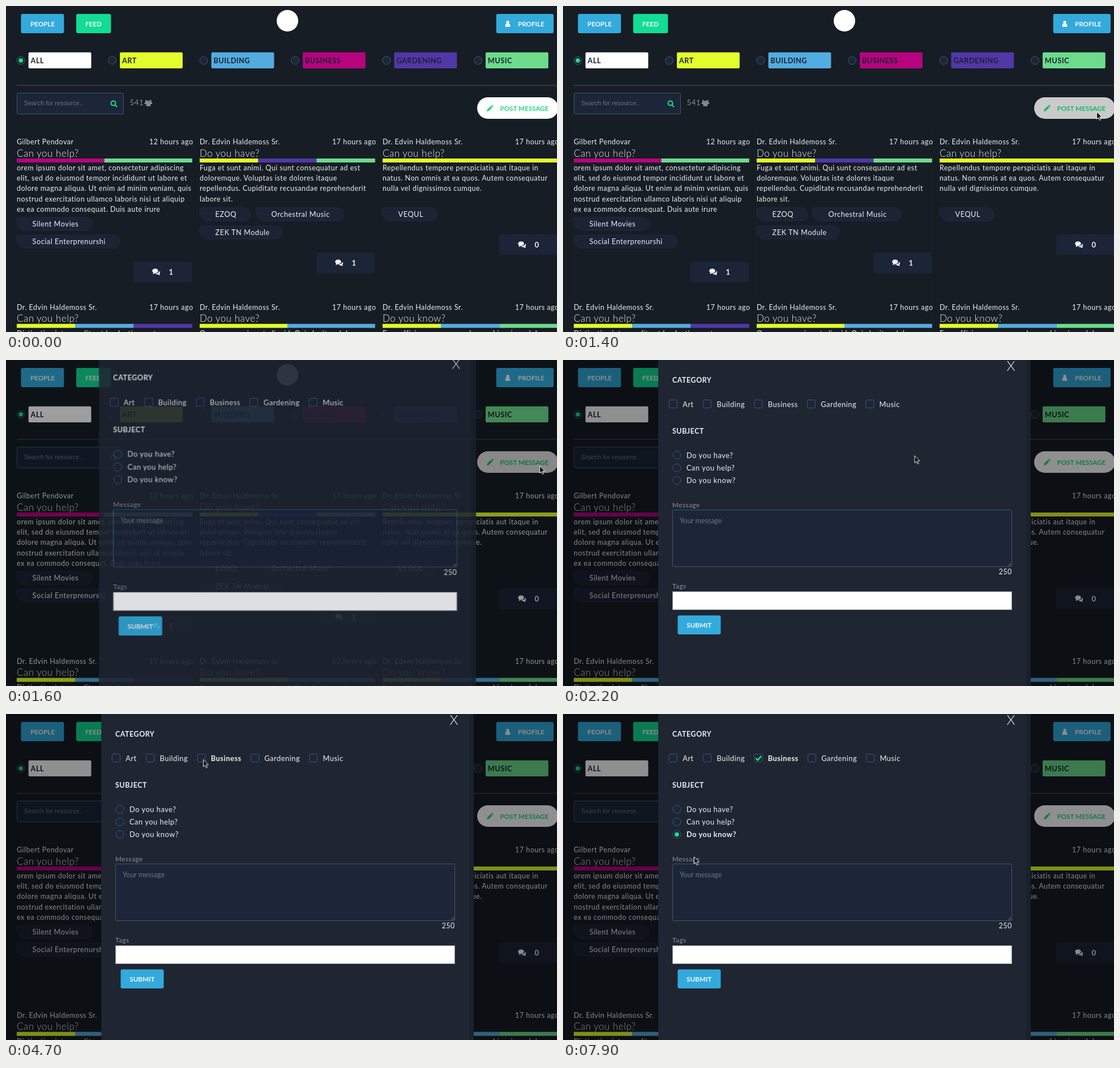
Recreate the animation shown at these times as an HTML page. Size 973 px wide and 575 px high, loop 8000 ms.

```html
<!DOCTYPE html>
<html lang="en">
<head>
<meta charset="utf-8">
<title>Message board</title>
<style>
html, body { margin: 0; width: 100%; height: 100%; overflow: hidden; background: #161d24; }
svg { display: block; width: 973px; height: 575px; }
text { font: 12.5px Lato, sans-serif; letter-spacing: .5px; fill: #eef0f2; white-space: pre; }
.btn { font-size: 11.65px; font-weight: 700; letter-spacing: 0; fill: #f6fafc; }
.cat { font-size: 12.7px; font-weight: 700; fill: #1b2130; }
.head { font-size: 17px; font-weight: 300; }
.tag { font-size: 12.75px; }
.num { font-size: 13px; font-weight: 700; }
.count { font-size: 12.8px; letter-spacing: .9px; fill: #878e95; }
.find { font: 11.1px "Liberation Sans", Arial, sans-serif; letter-spacing: 0; fill: #6d747c; }
.title { font-weight: 700; }
.opt { font-size: 12.9px; }
.label { font-size: 11.8px; fill: #8b929b; }
.hint { font-size: 12.4px; letter-spacing: 0; fill: #6f7680; }
.close { font-size: 24px; font-weight: 300; letter-spacing: 0; }
.field { fill: #1c2638; stroke: #3f5574; }

.post, .ink, .veil, .modal, .bold, .pick, .push, .tick, .dot, .cursor {
  animation: 8s step-end infinite;
}
.post { animation-name: post; }
.ink { animation-name: ink; }
.veil { animation-name: veil; }
.modal { animation-name: modal; transform-origin: 497.5px 320px; }
.bold { animation-name: bold; }
.pick { animation-name: pick; }
.push { animation-name: push; }
.tick { animation-name: tick; transform-origin: 345px 78px; }
.dot { animation-name: dot; transform-origin: 201px 212.5px; }
.cursor { animation-name: cursor; }

@keyframes post {
  0% { fill: #fff; }
  6.25% { fill: #fff; animation-timing-function: steps(5); }
  12.5% { fill: #cacaca; }
  18.75% { fill: #cacaca; animation-timing-function: steps(3); }
  22.5%, 100% { fill: #fff; }
}
@keyframes ink {
  0% { fill: #1fdc84; }
  6.25% { fill: #1fdc84; animation-timing-function: steps(5); }
  12.5% { fill: #18b96a; }
  22.5%, 100% { fill: #1fdc84; }
}
@keyframes veil {
  0% { opacity: 0; }
  18.75% { opacity: .2; }
  20% { opacity: .87; }
  21.25% { opacity: .98; }
  22.5%, 100% { opacity: 1; }
}
@keyframes modal {
  0% { opacity: 0; transform: scale(1.05); }
  18.75% { opacity: .2; transform: scale(1.04); }
  20% { opacity: .87; transform: scale(1.0125); }
  21.25% { opacity: .98; transform: scale(1.0015); }
  22.5%, 100% { opacity: 1; transform: none; }
}
@keyframes bold { 0% { font-weight: 400; } 58.75%, 100% { font-weight: 700; } }
@keyframes pick { 0% { font-weight: 400; } 92.5%, 100% { font-weight: 700; } }
@keyframes push { 0% { transform: none; } 58.75%, 100% { transform: translateX(1px); } }
@keyframes tick {
  0% { opacity: 0; transform: scale(.4); }
  58.75% { opacity: 0; transform: scale(.4); animation-timing-function: steps(3); }
  62.5%, 100% { opacity: 1; transform: scale(1); }
}
@keyframes dot {
  0% { opacity: 0; transform: scale(.2); }
  92.5% { opacity: 0; transform: scale(.2); animation-timing-function: steps(3); }
  96.25%, 100% { opacity: 1; transform: scale(1); }
}
@keyframes cursor {
  0% { transform: translate(978px, 182px); }
  6.25% { transform: translate(978px, 182px); animation-timing-function: steps(2); }
  8.75% { transform: translate(955px, 183px); animation-timing-function: steps(7); }
  17.5% { transform: translate(942px, 186px); }
  20% { transform: translate(942px, 186px); animation-timing-function: steps(3); }
  23.75% { transform: translate(815px, 178px); animation-timing-function: steps(3); }
  27.5% { transform: translate(620.5px, 168px); }
  28.75% { transform: translate(547px, 167px); }
  30% { transform: translate(546px, 167px); }
  36.25% { transform: translate(545px, 167px); }
  41.25% { transform: translate(545px, 168px); }
  45% { transform: translate(545px, 168px); animation-timing-function: steps(2); }
  47.5% { transform: translate(490px, 138px); animation-timing-function: steps(2); }
  50% { transform: translate(390px, 78px); }
  51.25% { transform: translate(360px, 64px); }
  52.5% { transform: translate(349px, 77px); }
  55% { transform: translate(348px, 79.5px); }
  70% { transform: translate(348px, 79.5px); animation-timing-function: steps(9); }
  81.25% { transform: translate(221px, 212px); }
  82.5% { transform: translate(218px, 215.5px); animation-timing-function: steps(6); }
  90% { transform: translate(205px, 218px); }
  98.75%, 100% { transform: translate(231px, 251px); }
}
</style>
</head>
<body>
<svg id="stage" viewBox="0 0 973 575"></svg>
<script>
const YELLOW = '#e3fe2c', BLUE = '#53acdf', PINK = '#b6047f', PURPLE = '#5237a7', GREEN = '#6cdb8c';
const DARK = '#1c2437', LIVE = '#1de27c';

const text = (x, y, s, cls = '', extra = '') => `<text x="${x}" y="${y}" class="${cls}" ${extra}>${s}</text>`;
const box = (x, y, w, h, fill, r = 0, extra = '') =>
  `<rect x="${x}" y="${y}" width="${w}" height="${h}" rx="${r}" fill="${fill}" ${extra}/>`;
const field = (x, y, w, h, r = 2) => `<rect x="${x}" y="${y}" width="${w}" height="${h}" rx="${r}" class="field"/>`;
const disc = (x, y, r, fill, extra = '') => `<circle cx="${x}" cy="${y}" r="${r}" fill="${fill}" ${extra}/>`;
const radio = (x, y) => `<circle cx="${x}" cy="${y}" r="7" class="field"/>`;
const button = (x, y, w, h, fill, tx, s) => box(x, y, w, h, fill, 3) + text(tx, y + 21.5, s, 'btn');

const person = (x, y, k, fill) => `<g transform="translate(${x} ${y}) scale(${k})" fill="${fill}">
  <circle cy="-3" r="2.8"/><path d="M-4.5 5.5V3q0-3.500 3-3.500h3q3 0 3 3.500v2.500z"/></g>`;

const bubbles = (x, y) => `<g transform="translate(${x} ${y})" fill="#f2f4f6">
  <path d="M2 2Q6 1 6 -2Q8 0 6.500 2.500Q5.500 3.500 7 5.500Q4 5.500 2.500 4.200Q0 4.600 -1.500 3.600Q1 3.300 2 2z"/>
  <ellipse cx="-1.500" cy="-1.800" rx="5.200" ry="4"/><path d="M-5 0Q-4.500 2.500 -6 3.800Q-3 3.700 -1.500 1.500z"/></g>`;

const replies = (x, y, n) => box(x, y, 103, 36, DARK, 2) + bubbles(x + 40, y + 18) + text(x + 62.5, y + 23, n, 'num');

const pill = (x, y, w, s) =>
  `<path d="M${x + 3} ${y}h${w - 15}a12 11 0 0 1 12 11v1a11 11 0 0 1-11 11h${26 - w}
    a15 15 0 0 1-15-15v-5a3 3 0 0 1 3-3z" fill="#1b2334" stroke="#232c40"/>` + text(x + 27.6, y + 16, s, 'tag');

// Equal coloured parts under a post heading
const strip = (x, y, colors) => {
  const w = 309.6 / colors.length;
  return colors.map((c, i) => box(x + i * w, y, w + .2, 7, c)).join('');
};

const post = (x, y, name, ago, head, colors, lines) =>
  text(x, y, name) + text(x + 234, y, ago) + text(x, y + 21.5, head, 'head') +
  strip(x, y + 25, colors) +
  lines.map((s, i) => text(x, y + 46 + i * 18.2, s)).join('');

const doctor = 'Dr. Edvin Haldemoss Sr.', late = '17 hours ago';

function header() {
  const cats = [['ALL', '#fff'], ['ART', YELLOW], ['BUILDING', BLUE], ['BUSINESS', PINK], ['GARDENING', PURPLE], ['MUSIC', GREEN]];
  return button(26.4, 14, 76, 34, '#33aadc', 43, 'PEOPLE') +
    button(124, 14, 61.4, 34, '#12dc95', 140, 'FEED') +
    button(865.7, 14, 101.3, 34, '#33aadc', 904, 'PROFILE') +
    person(886, 31.5, .95, '#f6fafc') +
    disc(497, 26, 19, '#fff') +
    cats.map(([s, c], i) => {
      const x = 26.2 + i * 161.45;
      return radio(x, 96) + box(x + 13.5, 81.7, 110.8, 28.2, c, 2) + text(x + 17.4, 100.5, s, 'cat');
    }).join('') +
    disc(26.2, 96, 3.8, LIVE) +
    box(19, 139.5, 954, 1, '#4b5661');
}

function tools() {
  return field(19.5, 153.5, 188, 37) + text(32, 175, 'Search for resource..', 'find') +
    `<g fill="none" stroke="${LIVE}" stroke-width="2"><circle cx="189.500" cy="171.500" r="4"/><path d="M192.500 174.500l3.500 3.800"/></g>` +
    text(218.7, 175, '541', 'count') +
    person(247.6, 169.5, .65, '#878e95') + person(255.2, 169.5, .65, '#878e95') + person(251.4, 172, .85, '#878e95') +
    box(832, 161, 143, 38, '#fff', 19, 'class="post"') +
    `<path class="ink" d="M849 186l.8-3.600 6-6 2.800 2.800-6 6zM856.500 175.700l1-1q.8-.6 1.500 0l1.300 1.300q.6.800 0 1.500l-1 1z"/>` +
    text(872.5, 185, 'POST MESSAGE', 'btn ink');
}

function feed() {
  return [12, 334, 657].map(x => box(x, 215, 1, 360, '#131a20')).join('') +
    post(19, 244, 'Gilbert Pendovar', '12 hours ago', 'Can you help?', [PINK, GREEN], [
      'orem ipsum dolor sit amet, consectetur adipiscing',
      'elit, sed do eiusmod tempor incididunt ut labore et',
      'dolore magna aliqua. Ut enim ad minim veniam, quis',
      'nostrud exercitation ullamco laboris nisi ut aliquip',
      'ex ea commodo consequat. Duis aute irure']) +
    pill(19, 373, 133, 'Silent Movies') + pill(19, 404, 182, 'Social Enterprenurshi') + replies(225, 451, 1) +
    post(342, 244, doctor, late, 'Do you have?', [YELLOW, PURPLE, GREEN], [
      'Fuga et sunt animi. Qui sunt consequatur ad est',
      'doloremque. Voluptas iste dolores itaque',
      'repellendus. Cupiditate recusandae reprehenderit',
      'labore sit.']) +
    pill(342, 356, 90, 'EZOQ') + pill(441, 356, 156, 'Orchestral Music') + pill(342, 388, 146, 'ZEK TN Module') +
    replies(548, 435, 1) +
    post(665, 244, doctor, late, 'Can you help?', [YELLOW], [
      'Repellendus tempore perspiciatis aut itaque in',
      'natus. Non omnis at ea quos. Autem consequatur',
      'nulla vel dignissimos cumque.']) +
    pill(665, 356, 96, 'VEQUL') + replies(871, 403, 0) +
    post(19, 535.7, doctor, late, 'Can you help?', [YELLOW, BLUE, PURPLE], ['Distinctio sint expedita et laudantium natus']) +
    post(342, 535.7, doctor, late, 'Do you have?', [YELLOW, BLUE], ['Quam esse qui sunt aliquid. Qui ab vitae dolorem']) +
    post(665, 535.7, doctor, late, 'Do you know?', [YELLOW, BLUE, GREEN], ['Eum officia eaque eaque. Iure nobis minus dolorem.']);
}

function modal() {
  const cats = [['Art', 187], ['Building', 247.3], ['Business', 337.5], ['Gardening', 431], ['Music', 534.3]];
  const asks = ['Do you have?', 'Can you help?', 'Do you know?'];
  return box(168.5, -30, 657.5, 640, '#1a212c') + box(168.5, -30, 649.5, 640, '#1f2632') +
    text(791, 19, 'X', 'close', 'text-anchor="middle"') +
    text(193, 39.5, 'CATEGORY', 'title') +
    cats.map(([s, x], i) => `<g class="${i > 2 ? 'push' : ''}">` + field(x + .5, 70.5, 14, 14) +
      text(x + 24.2, 82.5, s, i === 2 ? 'opt bold' : 'opt') + '</g>').join('') +
    `<path class="tick" d="M340.500 77.800l3.300 3.500 6.200-7" fill="none" stroke="${LIVE}" stroke-width="2.600"/>` +
    text(193, 130, 'SUBJECT', 'title') +
    asks.map((s, i) => radio(201, 168 + i * 22.2) + text(218, 172.5 + i * 22.2, s, i === 2 ? 'opt pick' : 'opt')).join('') +
    disc(201, 212.5, 3.8, LIVE, 'class="dot"') +
    text(193, 259.5, 'Message', 'label') +
    field(193.5, 264.5, 599, 100) +
    '<path d="M786 363.500l5.500-5.500M789 363.500l2.500-2.500" stroke="#8d949c" stroke-width=".8"/>' +
    text(206, 287.5, 'Your message', 'hint') +
    text(769.5, 378, '250') +
    text(193, 403, 'Tags', 'label') +
    box(193.5, 408.5, 599, 32, '#fff', 0, 'stroke="#858b93"') +
    button(202.5, 450.5, 76, 33.5, '#33aadc', 218.3, 'SUBMIT');
}

document.getElementById('stage').innerHTML =
  box(0, 0, 973, 575, '#161d24') + header() + tools() + feed() +
  `<g class="veil">${box(0, 0, 973, 575, '#000', 0, 'opacity=".44"')}</g>` +
  `<g class="modal">${modal()}</g>` +
  '<path class="cursor" d="M.5.8v12.700l2.900-2.700 2 4.700 2.100-.9-2-4.600h4z" fill="#0b0d10" stroke="#fff" stroke-width=".9"/>';
</script>
</body>
</html>
```
